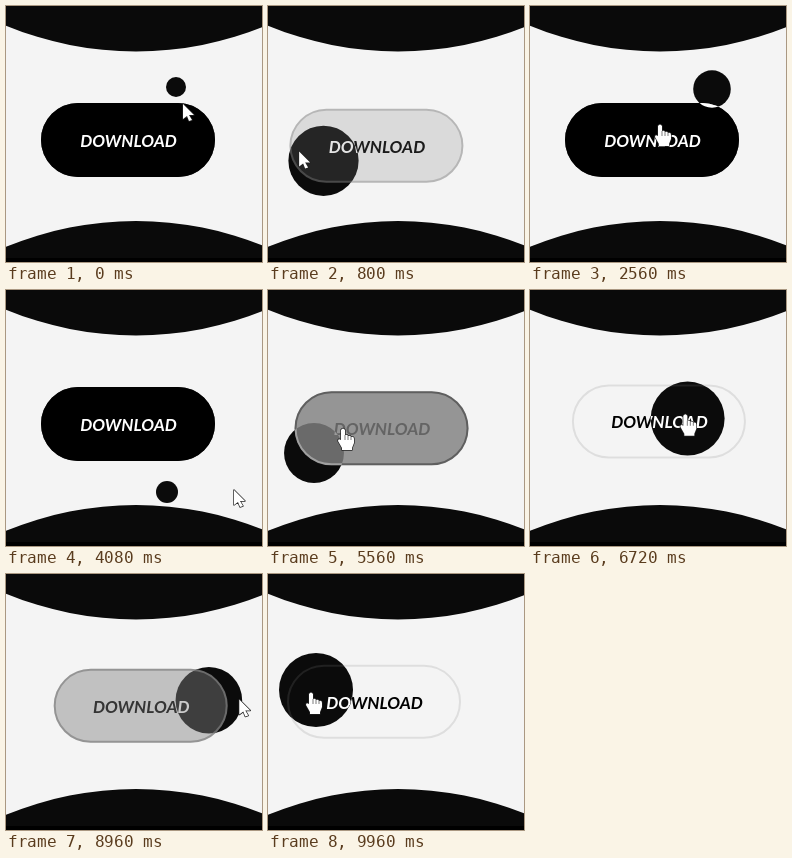
An HTML page with a canvas that plays this animation: 256 px wide and 256 px high, repeating every 10000 ms.

```html
<!DOCTYPE html>
<html lang="en">
<head>
<meta charset="utf-8">
<title>Magnetic button</title>
<style>
  html, body { margin: 0; width: 100%; height: 100%; overflow: hidden; background: #f4f4f4; }
  canvas { display: block; width: 256px; height: 256px; }
</style>
</head>
<body>
<canvas id="stage" width="256" height="256"></canvas>
<script>
const ctx = document.getElementById('stage').getContext('2d');
const LOOP = 10000, FRAME = 40;
const BALL_LAG = 120, BUTTON_LAG = 80;

// Pointer path: time, x, y
const path = [
  [-120, 170, 81], [0, 177, 98], [360, 140, 150], [760, 38, 150], [1080, 10, 95],
  [1480, 62, 110], [1600, 136, 144], [1900, 232, 180], [2200, 244, 140], [2440, 182, 83],
  [2560, 130, 118], [2800, 60, 190], [3040, 36, 180], [3400, 56, 148], [3600, 130, 100],
  [3820, 112, 180], [3960, 161, 202], [4080, 228, 200], [4400, 226, 150], [4760, 130, 100],
  [5200, 58, 190], [5440, 46, 163], [5560, 75, 138], [5960, 160, 160], [6800, 155, 122],
  [7250, 165, 142], [7720, 136, 133], [7840, 154, 102], [8640, 160, 125], [9040, 244, 125],
  [9420, 205, 120], [9840, 48, 116], [9960, 43, 118]
];
// Spans in which the pointer is over the button
const hovers = [[20, 790], [1421, 1860], [2510, 2770], [3110, 3854],
                [4540, 5150], [5423, 8940], [9440, LOOP]];

const clamp = (v, lo, hi) => Math.min(hi, Math.max(lo, v));

function pointerAt(t) {
  const last = path.length - 1;
  t = clamp(t, path[0][0], path[last][0]);
  let i = 0;
  while (i < last - 1 && path[i + 1][0] <= t) i++;
  const a = path[i], b = path[i + 1], span = b[0] - a[0], u = (t - a[0]) / span;
  const slope = (k, axis) => {
    const p = path[Math.max(k - 1, 0)], q = path[Math.min(k + 1, last)];
    return (q[axis] - p[axis]) / (q[0] - p[0]) * span;
  };
  const ease = u * u * (3 - 2 * u);
  return [1, 2].map(axis => a[axis] + (b[axis] - a[axis]) * ease +
    u * (1 - u) * ((1 - u) * slope(i, axis) - u * slope(i + 1, axis)));
}

const rise = ms => 1 - (1 - clamp(ms / 280, 0, 1)) ** 2;
const hoverAmount = t =>
  Math.max(...hovers.map(([enter, leave]) => rise(t - enter) * (1 - rise(t - leave))));

function disc(x, y, r, color) {
  ctx.fillStyle = color;
  ctx.beginPath();
  ctx.arc(x, y, r, 0, 2 * Math.PI);
  ctx.fill();
}

function pill(inset) {
  const r = 37 - inset;
  ctx.beginPath();
  ctx.roundRect(-50 - r, -r, 100 + 2 * r, 2 * r, r);
}

function drawBackground() {
  ctx.fillStyle = '#f4f4f4';
  ctx.fillRect(0, 0, 256, 256);
  disc(130, -294.5, 340, '#0a0a0a');
  disc(130, 555, 340, '#0a0a0a');
  ctx.fillStyle = '#000';
  ctx.fillRect(0, 252, 256, 4);
}

function drawButton(dx, dy, solid) {
  ctx.save();
  ctx.translate(122 + dx, 134 + dy);
  pill(0);
  ctx.fillStyle = `rgba(0,0,0,${solid})`;
  ctx.fill();
  pill(1);
  ctx.strokeStyle = `rgba(0,0,0,${0.09 + 0.7 * solid})`;
  ctx.lineWidth = 2;
  ctx.stroke();
  const grey = Math.round(255 * solid);
  ctx.fillStyle = `rgb(${grey},${grey},${grey})`;
  ctx.font = 'italic 700 17px Lato, sans-serif';
  ctx.textAlign = 'center';
  ctx.fillText('DOWNLOAD', 0.5, 7);
  ctx.restore();
}

const arrow = new Path2D('M0 0V15L4 12L6 17L9 16L6 11H11Z');
const hand = new Path2D('M-2 2Q0-1 2 2V7Q4 6 5 8Q7 7 8 9Q11 8 11 11V15L9 20V22H-1V20L-5 13Q-5 10-2 12Z');

function drawPointer(x, y, shape) {
  ctx.save();
  ctx.translate(x, y);
  ctx.lineJoin = 'round';
  ctx.lineWidth = 1.4;
  ctx.strokeStyle = '#222';
  ctx.stroke(shape);
  ctx.fillStyle = '#fff';
  ctx.fill(shape);
  if (shape === hand) {
    ctx.lineWidth = 0.6;
    ctx.stroke(new Path2D('M2 7v5M5 8v4M8 9v3'));
  }
  ctx.restore();
}

function draw(now) {
  let t = Math.floor(now % LOOP / FRAME) * FRAME;
  // The picture stalls briefly twice per loop
  if (t > 3200 && t < 3400) t = 3200;
  if (t > 4400 && t < 4480) t = 4400;

  const radius = 10 + 27 * hoverAmount(t);
  const solid = clamp((37 - radius) / 18, 0, 1);
  const pull = 1 - solid;
  const [px, py] = pointerAt(t);
  const [bx, by] = pointerAt(t - BALL_LAG);
  const [mx, my] = pointerAt(t - BUTTON_LAG);

  drawBackground();
  drawButton(clamp(0.2 * (mx - 122), -16, 16) * pull, clamp(0.35 * (my - 134), -9, 9) * pull, solid);
  ctx.globalCompositeOperation = 'difference';
  disc(bx, by, radius, '#fff');
  ctx.globalCompositeOperation = 'source-over';
  const over = hovers.some(([enter, leave]) => t >= enter && t < leave);
  drawPointer(px, py, over ? hand : arrow);
}

let start;
function tick(now) {
  start ??= now;
  draw(now - start);
  requestAnimationFrame(tick);
}
requestAnimationFrame(tick);
</script>
</body>
</html>
```
